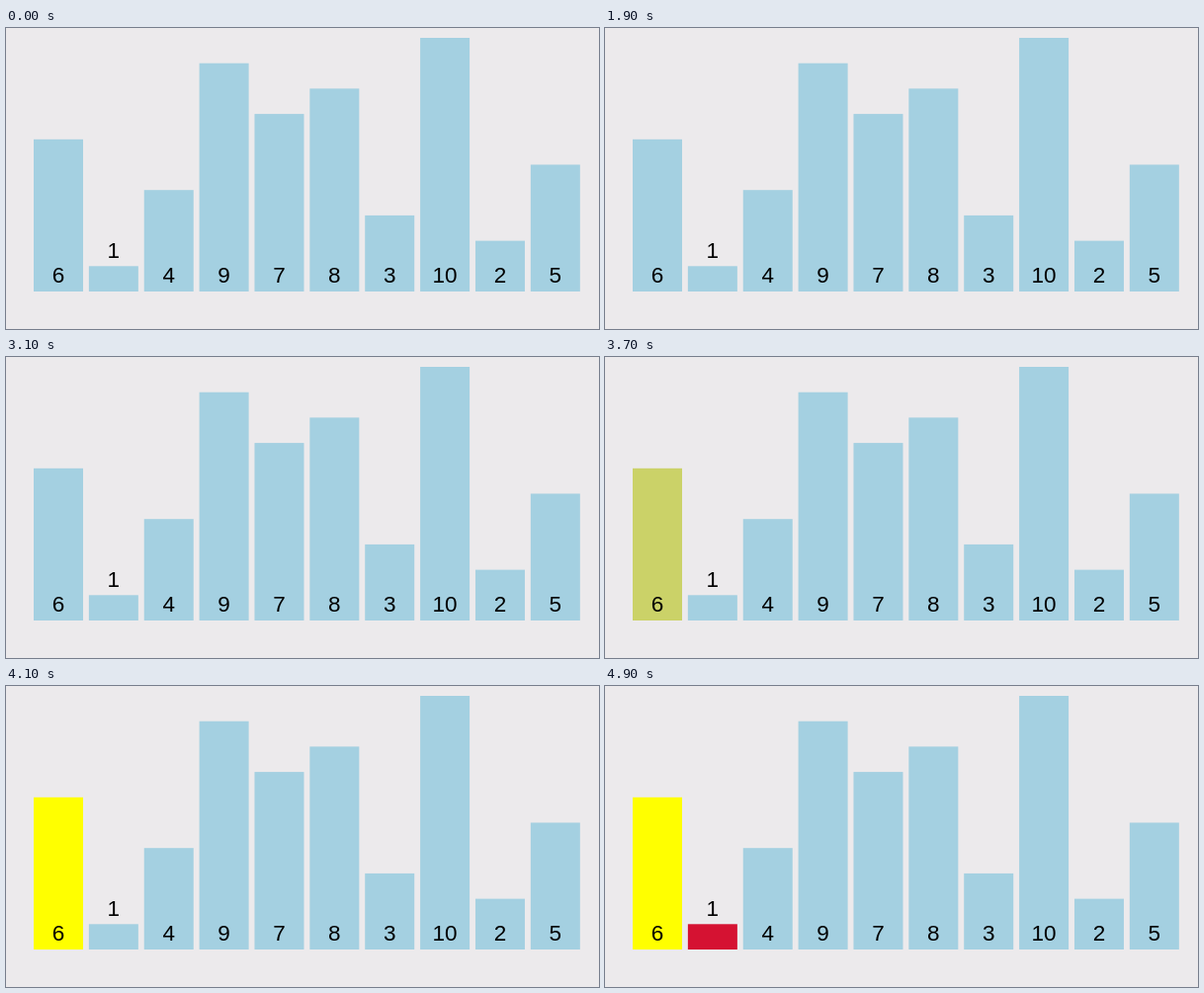
Animation of 600 by 305 pixels, one loop 5 s. Source, as an HTML page:

```html
<!DOCTYPE html>
<html lang="en">
<head>
<meta charset="utf-8">
<title>Sorting bars</title>
<style>
  html, body { margin: 0; width: 100%; height: 100%; overflow: hidden; background: #eceaec; }
  svg { display: block; width: 600px; height: 305px; }
  text { font: 22.5px "Liberation Sans", Arial, sans-serif; text-anchor: middle; fill: #000; }
</style>
</head>
<body>
<svg id="stage" viewBox="0 0 600 305"></svg>
<script>
const LOOP = 5000;
const BLUE = '#a4d0e1';
const LEFT = 28, PITCH = 55.87, WIDTH = 50, BASE = 267, UNIT = 25.7;
const values = [6, 1, 4, 9, 7, 8, 3, 10, 2, 5];

// Colour steps per bar: [time in ms, fill]
const steps = {
  0: [[0, BLUE], [3700, '#cbd268'], [3800, '#ffff00']],
  1: [[0, BLUE], [4600, '#a6becb'], [4700, '#b98a9f'], [4800, '#ca3f5b'], [4900, '#d51232']]
};

const stage = document.getElementById('stage');

function add(tag, attrs, text = '') {
  const el = document.createElementNS('http://www.w3.org/2000/svg', tag);
  for (const name in attrs) el.setAttribute(name, attrs[name]);
  el.textContent = text;
  return stage.appendChild(el);
}

const bars = values.map((value, i) => {
  const x = LEFT + PITCH * i;
  const height = value * UNIT;
  const bar = add('rect', { x, y: BASE - height, width: WIDTH, height, fill: BLUE });
  // The shortest bar carries its label on top
  add('text', { x: x + WIDTH / 2, y: value === 1 ? 232.5 : 258 }, value);
  return bar;
});

for (const i in steps) {
  const frames = steps[i].map(([time, fill]) => ({ offset: time / LOOP, fill, easing: 'step-end' }));
  frames.push({ offset: 1, fill: frames[frames.length - 1].fill });
  const anim = bars[i].animate(frames, { duration: LOOP, iterations: Infinity });
  anim.startTime = document.timeline.currentTime;
}
</script>
</body>
</html>
```
